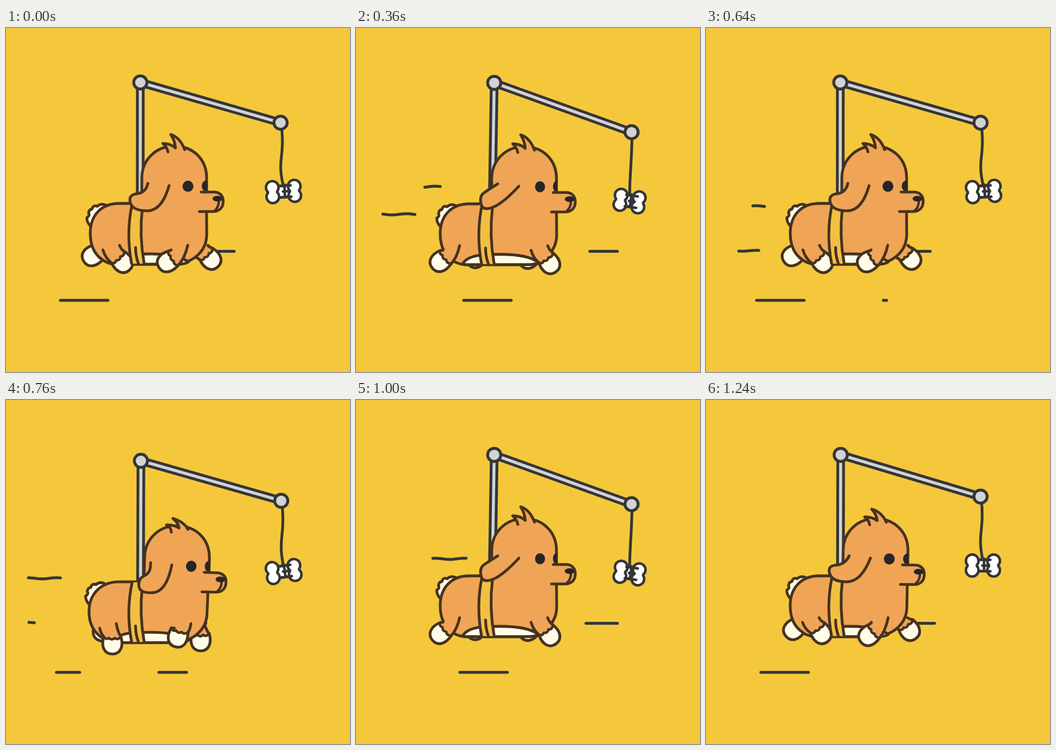
Write an HTML page with a canvas that moves like this. It is 600 px wide and 600 px high and loops after 1.28 s.

```html
<!DOCTYPE html>
<html lang="en">
<head>
<meta charset="utf-8">
<title>Running dog</title>
<style>
  html, body { margin: 0; height: 100%; overflow: hidden; background: #f5c83b; }
  canvas { display: block; width: 100vw; height: 100vh; }
</style>
</head>
<body>
<canvas id="stage" width="600" height="600"></canvas>
<script>
const ctx = document.getElementById('stage').getContext('2d');
const YELLOW = '#f5c83b', BROWN = '#45321f', DARK = '#343536', ORANGE = '#f0a556',
      CREAM = '#fffde8', STEEL = '#d3d3d5', STRAP = '#f3bf42', INK = '#262628';
const STEP = 40, STEPS = 32, STRIDE = 16, TAU = Math.PI * 2;

// One smooth oscillation per stride, highest at step `peak`.
const swing = (p, mean, amount, peak) => mean + amount * Math.cos(TAU * (p - peak) / STRIDE);

function draw(d, fill, stroke = BROWN, width = 4.8) {
  const path = new Path2D(d);
  if (fill) { ctx.fillStyle = fill; ctx.fill(path); }
  if (stroke) { ctx.strokeStyle = stroke; ctx.lineWidth = width; ctx.stroke(path); }
}

function ellipse(x, y, rx, ry, fill, stroke) {
  ctx.beginPath();
  ctx.ellipse(x, y, rx, ry, 0, 0, TAU);
  ctx.fillStyle = fill;
  ctx.fill();
  if (stroke) { ctx.strokeStyle = stroke; ctx.lineWidth = 5; ctx.stroke(); }
}

function placed(x, y, degrees, paint) {
  ctx.save();
  ctx.translate(x, y);
  ctx.rotate(degrees * Math.PI / 180);
  paint();
  ctx.restore();
}

// A line sliding left, visible only between low and high.
function streak(t, y, start, length, low, high, wave = 0) {
  const left = start - 0.356 * t;
  const a = Math.max(low, left), b = Math.min(high, left + length);
  if (a >= b) return;
  const point = x => `${x} ${y + wave * Math.sin(x / 8)}`;
  let d = `M${point(a)}`;
  for (let x = a + 3; x < b; x += 3) d += `L${point(x)}`;
  draw(`${d}L${point(b)}`, null, DARK, 5);
}

function streaks(t) {
  const cycle = t % 621;
  for (const s of [cycle, cycle + 621]) {
    streak(s, 475, 316, 83, 88, 315);
    streak(s, 389.5, 536, 83, 228, 456);
  }
  streak(t, 277, 217, 58, 120, 199, 1);
  streak(t, 277, 490, 58, 120, 199, 1);
  streak(t, 325, 175, 56, 22, 104, 1);
  streak(t, 311, 309.6, 56, 22, 102, 1);
  streak(t, 388.5, 285, 35, 40, 119, 0.7);
}

function bone(gap) {
  draw('M-12 -10H12V10H-12Z', '#fff', DARK);
  for (const side of [-1, 1]) {
    const x = side * gap / 2;
    for (const [r, color] of [[13.2, DARK], [8.8, '#fff']]) {
      for (const y of [-8.2, 8.2]) ellipse(x, y, r, r, color);
    }
    ellipse(x, 0, 6, 8, '#fff');
  }
  draw('M-7 -10H13M-7 10H13M2 -12V10M-1 0H9', null, DARK, 4.5);
}

function rod(p, bob) {
  const x = swing(p, 237.6, -3.5, 0.8), y = 95 + bob;
  const angle = swing(p, 17.7, -2.1, 1.6) * Math.PI / 180;
  const tipX = x + 254.5 * Math.cos(angle), tipY = y + 254.5 * Math.sin(angle);
  const boneX = tipX + swing(p, 1, 4.5, 1), boneY = tipY + 120 + 0.3 * bob;
  const sway = swing(p, 1.7, 2.3, 1);

  for (const d of [`M${x} ${y}L${234 + (x - 234) / 2} ${312 + bob}`, `M${x} ${y}L${tipX} ${tipY}`]) {
    draw(d, null, DARK, 15);
    draw(d, null, STEEL, 5.2);
  }
  draw(`M${tipX + 1} ${tipY}C${tipX + 1 + sway * 2} ${tipY + 65}
    ${boneX - 1 - sway * 3} ${boneY - 60} ${boneX} ${boneY - 8}`, null, DARK);
  ellipse(x, y, 11.5, 11.5, STEEL, DARK);
  ellipse(tipX, tipY, 11.5, 11.5, STEEL, DARK);
  placed(boneX, boneY, swing(p, 1, 9, 10.7), () => bone(swing(p, 35.3, 3.7, 1.5)));
}

// The foot circles around (centerX, centerY); diagonal legs share a phase.
function leg(p, centerX, centerY, phase, bob) {
  const turn = TAU * (p / STRIDE + phase), reach = Math.cos(turn);
  const x = centerX + 30 * reach, y = centerY + bob + 6 * Math.sin(turn);
  const tilt = 8 - 50 * reach * Math.abs(reach);
  const a = tilt * Math.PI / 180, cos = Math.cos(a), sin = Math.sin(a);
  const side = dir => {
    const hip = [centerX + 0.5 + dir * 14.5 + 9 * reach, 383 - 4 * dir + bob];
    const ankle = [x + dir * 15 * cos + 13 * sin, y + dir * 15 * sin - 13 * cos];
    const bend = [0.7 * hip[0] + 0.3 * ankle[0], 0.35 * hip[1] + 0.65 * ankle[1]];
    return { hip, ankle, bend };
  };
  const l = side(-1), r = side(1);

  placed(x, y, tilt, () => draw('M-15 -13C-20 4 -14 17 0 17S20 4 15 -13', CREAM));
  draw(`M${l.hip}Q${l.bend} ${l.ankle}L${r.ankle}Q${r.bend} ${r.hip}Z`, ORANGE, null);
  placed(x, y, tilt, () =>
    draw('M-15 -13Q-11 -7 -6 -11Q-1 -6 4 -11Q9 -7 15 -13', ORANGE, BROWN, 4.4));
  draw(`M${l.hip}Q${l.bend} ${l.ankle}M${r.hip}Q${r.bend} ${r.ankle}`);
}

function body(bob, lean) {
  const rear = 147 - 0.2 * bob;
  placed(-0.2 * bob, bob, 0, () =>
    draw('M149 347Q141 340 141 331Q147 327 144 323Q145 316 150 316Q152 308 159 311Q166 305 174 309', CREAM));
  placed(0, bob, 0, () => {
    draw(`M238 306H197C168 306 ${rear} 325 ${rear} 358C${rear} 378 153 394 168 404Q176 411 190 412
      H290C325 412 ${350 + lean} 390 ${350 + lean} 360L${349.5 + lean * 5} 312`, ORANGE);
    draw('M186 411C195 394 225 394 252 394S305 398 318 408Q312 412 300 412H190Z', CREAM);
  });
}

function strap(bob) {
  placed(0, bob, 0, () => {
    draw('M220 307Q209 358 219 411H241Q232 362 238 307Z', STRAP, null);
    draw('M220 307Q209 358 219 411M238 312Q232 362 241 411M226 383Q226 398 231 411');
  });
}

function tuft(lean) {
  const drop = 13 * lean;
  draw(`M282 ${216 + drop * 0.2}Q280 207 273 ${201 + drop * 0.5}Q286 ${201 + drop * 0.4} 295 ${209 + drop * 0.1}
    Q294 ${196 + drop * 0.6} ${287 - 5 * lean} ${185 + drop}Q303 ${190 + drop} 311 212`, ORANGE);
}

function face(p, lean) {
  const turn = swing(p, 2, -2, 0), eyeEdge = 338 + turn * 0.8;
  const dome = 'M236.5 302V262C236.5 230 261 206 293 206S349.5 228 349.5 262V290';
  draw(dome + 'V322H239Z', ORANGE, null);
  draw(dome);
  tuft(lean);
  draw(`M350.5 266C${eyeEdge} 265 ${eyeEdge} 286 350.5 285Z`, INK, null);
  ctx.translate(turn, 0);
  ellipse(317, 276, 9.5 - turn * 0.2, 9.7, INK);
  draw('M340 286H362C374 286 378.5 294 378.5 302C378.5 313 372 320 360 320H337', ORANGE);
  draw('M371 300Q371 312 364 318', null, BROWN, 4.2);
  ellipse(368.5, 297.5, 8.5, 5, INK);
}

function ear(p) {
  const corner = (x, y, dx, dy, lag) => [swing(p, x, dx, lag), swing(p, y, dy, lag)];
  const middle = (a, b) => [(a[0] + b[0]) / 2, (a[1] + b[1]) / 2];
  const fold = corner(238, 285, 10, 4, 2.5), back = corner(216, 293, 12, 7, 4.8),
        tip = corner(222, 320, 7, 6, 4.5), front = corner(265, 313, 10, 9, 2.2);
  draw(`M247 271Q${fold} ${middle(fold, back)}Q${back} ${middle(back, tip)}
    Q${tip} ${middle(tip, front)}Q${front} 284 275`, ORANGE);
}

function render(now) {
  const step = Math.floor(now / STEP) % STEPS, p = step % STRIDE;
  const q = p % 8, rise = Math.min(q, 8 - q) / 4;
  const bob = 11.8 * (rise < 0.5 ? 4 * rise ** 3 : 1 - 4 * (1 - rise) ** 3);
  const lean = swing(2 * p, 0.5, 0.5, 9.2);

  ctx.fillStyle = YELLOW;
  ctx.fillRect(0, 0, 600, 600);
  ctx.lineCap = ctx.lineJoin = 'round';
  streaks(step * STEP);
  rod(p, bob);
  leg(p, 180, 398, 0.5, bob);
  leg(p, 328, 404, 0, bob);
  body(bob, lean);
  leg(p, 174, 409.5, 0, bob);
  leg(p, 311, 408.5, 0.5, bob);
  placed(293 + 7 * lean, 285 + 1.2 * bob, 2.5 * lean, () => {
    ctx.translate(-293, -285);
    face(p, lean);
  });
  strap(bob);
  placed(8 * lean, 1.15 * bob, 0, () => ear(p));
}

function loop() {
  render(performance.now());
  requestAnimationFrame(loop);
}
loop();
</script>
</body>
</html>
```
